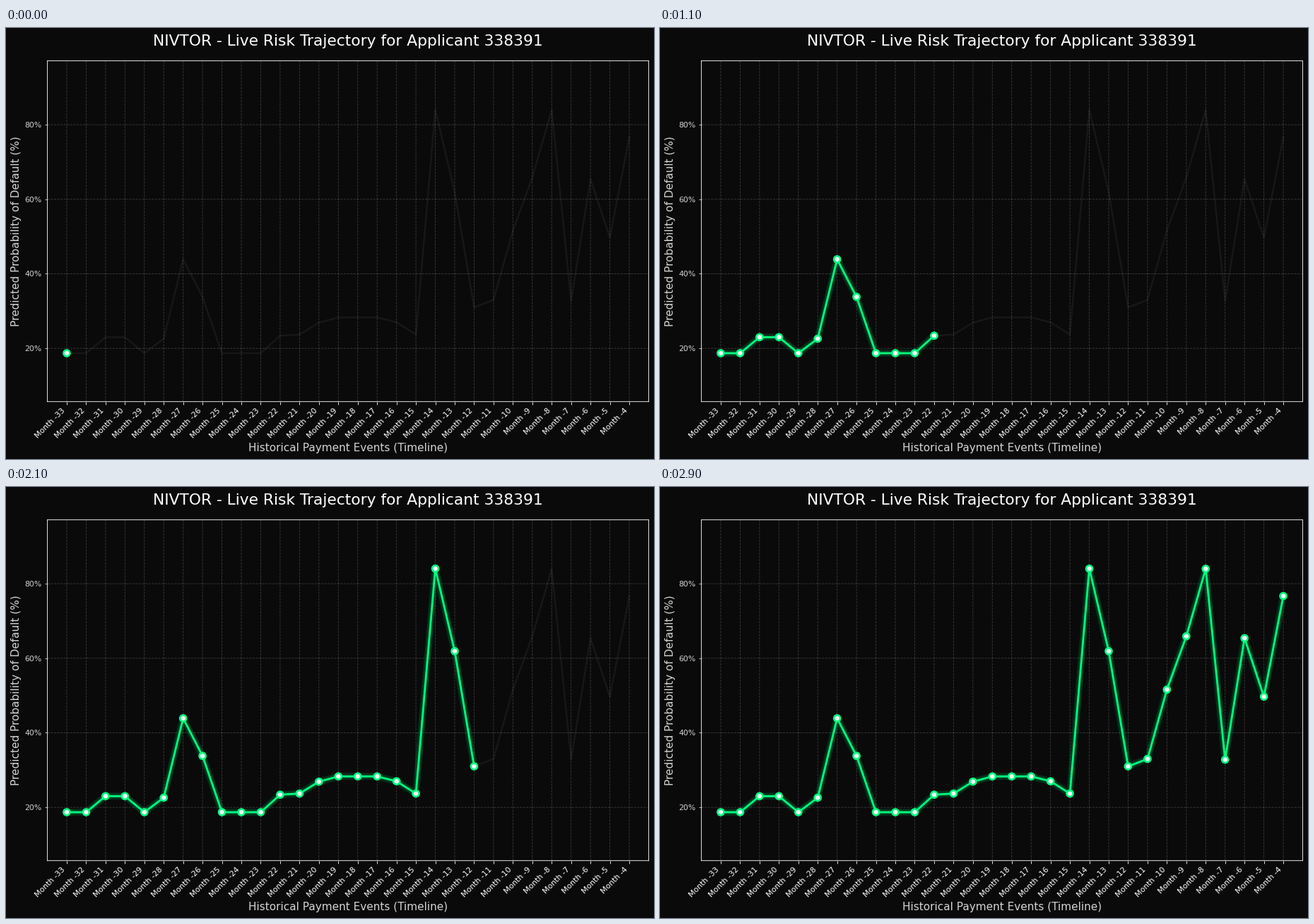
Recreate the animation shown at these times as a matplotlib script. Size 917 by 611 pixels, loop 2920 ms.

```python
import matplotlib.pyplot as plt
from matplotlib.animation import FuncAnimation
from matplotlib.markers import TICKDOWN, TICKLEFT

W, H, DPI = 917, 611, 64
PT = 78.3 / DPI                    # scale for all point sizes
LEFT, RIGHT, TOP, BOTTOM = 58.5, 909.5, 46.5, 529.7
YMIN, YMAX = 5.7, 97.15

BG, GREEN, SOFT = "#0a0a0a", "#00ff7f", "#d3d3d3"
STEP_MS, TICK_MS, LOOP_MS = 100, 20, 2920

risk = [18.7, 18.7, 23, 23, 18.7, 22.6, 43.9, 33.8, 18.7, 18.7,
        18.7, 23.4, 23.7, 26.9, 28.3, 28.3, 28.3, 27, 23.7, 84.05,
        61.9, 31, 33, 51.6, 65.9, 84, 32.8, 65.4, 49.7, 76.7]
N = len(risk)
months = list(range(N))
points = list(zip(months, risk))
levels = [20, 40, 60, 80]

# Without snapping, thin lines keep their fractional pixel positions
plt.rcParams.update({"font.family": "DejaVu Sans", "path.snap": False})
fig = plt.figure(figsize=(W / DPI, H / DPI), dpi=DPI, facecolor=BG)
ax = fig.add_axes([LEFT / W, 1 - BOTTOM / H, (RIGHT - LEFT) / W, (BOTTOM - TOP) / H],
                  facecolor=BG)
ax.set(xlim=(-1, N), ylim=(YMIN, YMAX), xticks=[], yticks=[])
for spine in ax.spines.values():
    spine.set(color="white", linewidth=0.8 * PT)


def label(x, y, text, size, color="white", **kw):
    """Place text at stage pixels, y counted from the top."""
    fig.text(x / W, 1 - y / H, text, fontsize=size * PT, color=color, **kw)


def tick_marks(x, y, marker, color, transform):
    ax.plot(x, y, ls="none", marker=marker, ms=3.5 * PT, mew=0.8 * PT,
            color=color, transform=transform, clip_on=False, zorder=2.6)


# Grid, ticks and texts
grid = dict(color="white", alpha=0.2, lw=0.8 * PT, ls="--", zorder=1)
for m in months:
    ax.axvline(m, **grid)
for v in levels:
    ax.axhline(v, **grid)
tick_marks(months, [0] * N, TICKDOWN, "white", ax.get_xaxis_transform())
tick_marks([0] * len(levels), levels, TICKLEFT, SOFT, ax.get_yaxis_transform())

gap = 7 * PT * DPI / 72
for m in months:
    x = LEFT + (m + 1) * (RIGHT - LEFT) / (N + 1)
    label(x, BOTTOM + gap, f"Month -{33 - m}", 10, rotation=45, ha="right", va="top")
for v in levels:
    y = BOTTOM - (v - YMIN) / (YMAX - YMIN) * (BOTTOM - TOP)
    label(LEFT - gap, y, f"{v}%", 10, SOFT, ha="right", va="center_baseline")

mid_x, mid_y = (LEFT + RIGHT) / 2, (TOP + BOTTOM) / 2
label(mid_x, 24.9, "NIVTOR - Live Risk Trajectory for Applicant 338391", 20,
      ha="center", va="baseline")
label(mid_x, 600.3, "Historical Payment Events (Timeline)", 14, SOFT,
      ha="center", va="baseline")
label(18.6, mid_y, "Predicted Probability of Default (%)", 14, SOFT,
      ha="center", va="baseline", rotation=90, rotation_mode="anchor")

# Faint full path, then the growing glow, line and markers
ax.plot(months, risk, color="white", alpha=0.055, lw=2.3 * PT, zorder=2)
trail = [ax.plot([], [], color=GREEN, alpha=0.05, lw=(2.5 + 1.3 * n) * PT, zorder=3)[0]
         for n in range(1, 7)]
trail += ax.plot([], [], color=GREEN, lw=2.5 * PT, zorder=4)
# One size per dot keeps the dots off the whole-pixel grid
dots = ax.scatter(months, risk, s=[(8.3 * PT) ** 2] * N, linewidths=2.4 * PT,
                  facecolors="white", edgecolors=GREEN, zorder=5)


def update(i):
    count = min(i * TICK_MS // STEP_MS + 1, N)
    for line in trail:
        line.set_data(months[:count], risk[:count])
    dots.set_offsets(points[:count])
    return [*trail, dots]


anim = FuncAnimation(fig, update, frames=LOOP_MS // TICK_MS, interval=TICK_MS,
                     init_func=lambda: update(0), repeat=True, repeat_delay=0)
plt.show()
```
